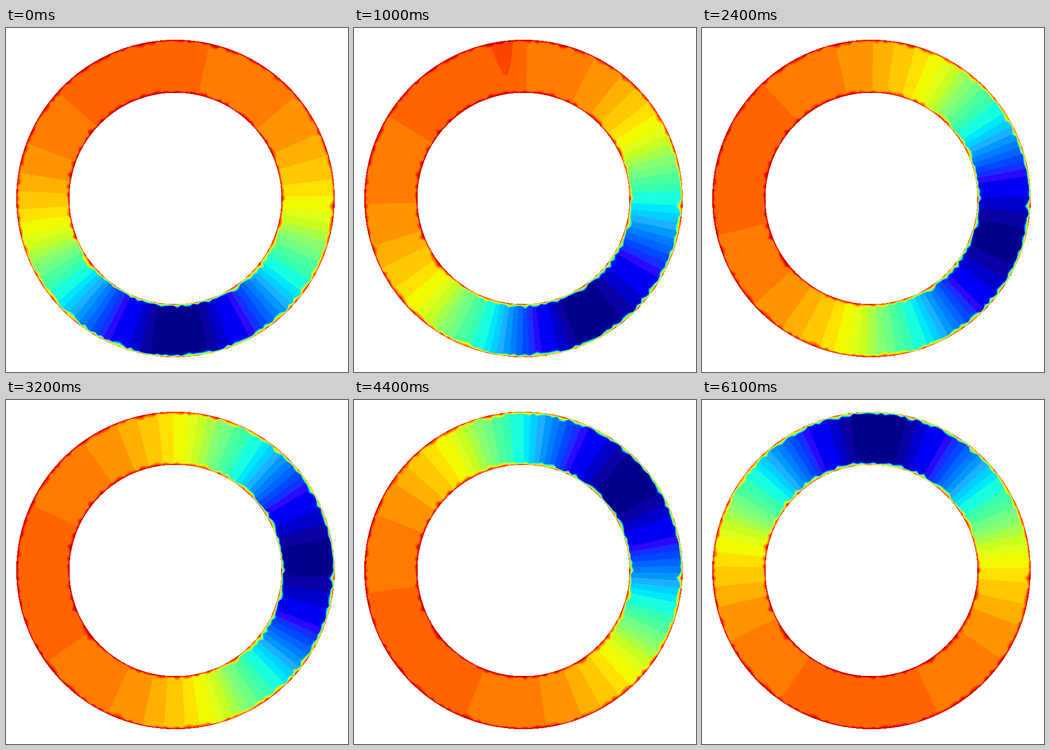
These frames come from a looping animation (666x672 px, 6.2 s). An HTML page with a canvas:

```html
<!DOCTYPE html>
<html lang="en">
<head>
<meta charset="utf-8">
<title>Ring field</title>
<style>
html, body { margin: 0; width: 100%; height: 100%; overflow: hidden; background: #fefffe; }
canvas { display: block; }
</style>
</head>
<body>
<canvas id="stage" width="666" height="672"></canvas>
<script>
const W = 666, H = 672, CX = 330, CY = 333, R_IN = 206.5, R_OUT = 310;
const LOOP = 6200, STEP = 100, BINS = 7200;

const palette = ('00008a 0a00a4 0000cc 0000f5 0000f5 2a08f8 1430ff 0048ff 0064ff 007cff 0098ff ' +
  '1cb0ff 00d0ff 00e8ff 18ffe0 38ffb0 4cff9c 70ff84 88ff70 a8ff48 c8ff20 ' +
  'e0ff18 f2fa00 ffe000 ffc800 ffb000 ff9400 ff7c00 ff6400 ff4400 f42000 e00000 c00000 a00000')
  .split(' ').map(hex => {
    const n = parseInt(hex, 16);
    return (255 << 24 | (n & 255) << 16 | (n & 0xff00) | n >> 16) >>> 0;
  });
const TOP = palette.length - 0.5, HOT = 28;

const mix = (a, b, k) => a + (b - a) * k;
const mod = (a, n) => ((a % n) + n) % n;
const rad = deg => deg * Math.PI / 180;
const bell = (t, at, width) => Math.exp(-(((t - at) / width) ** 2));

let seed = 4711;
function rand() {
  seed = (seed * 16807) % 2147483647;
  return seed / 2147483647;
}

// Fixed ragged rim: depth and strength at nodes around the edge
function makeRim(count, spots) {
  const nodes = Array.from({ length: count }, () => (
    { depth: 3 + 8 * rand() ** 1.5, power: 0.72 + 0.28 * rand() }
  ));
  for (const deg of spots) {
    const i = Math.round(mod(deg, 360) / 360 * count) % count;
    nodes[i] = { depth: 13, power: 1 };
  }
  return (deg, d) => {
    const p = deg / 360 * count, i = Math.floor(p) % count, k = p - Math.floor(p);
    const a = nodes[i], b = nodes[(i + 1) % count];
    return Math.max(0, 1 - d / mix(a.depth, b.depth, k)) * mix(a.power, b.power, k);
  };
}
const outerRim = makeRim(250, [3]);
const innerRim = makeRim(170, [-142, 142, 39, -168, 158]);

const cells = [];
for (let y = 0; y < H; y++) {
  for (let x = 0; x < W; x++) {
    const dx = x + 0.5 - CX, dy = y + 0.5 - CY, r = Math.hypot(dx, dy);
    if (r < R_IN || r > R_OUT) continue;
    const deg = mod(Math.atan2(dy, dx) * 180 / Math.PI, 360);
    const rim = Math.max(outerRim(deg, R_OUT - r), innerRim(deg, r - R_IN));
    cells.push({ at: y * W + x, bin: Math.floor(deg / 360 * BINS) % BINS, deg, r, rim });
  }
}

// Level against distance in degrees from the cold spot
const profile = width => [[0, 0.3], [width, 1], [18.7, 3], [26.3, 5], [51, 14], [56, 15],
  [80.5, 22], [91.5, 24], [107, 26], [120.5, 27], [150, HOT], [180, HOT]];

const field = new Float32Array(BINS);
function fillField(t) {
  // Steady turn with a start-up swing that settles
  const cold = 86.5 - 28.54 * t + 4.5 * bell(t, 0.75, 0.9);
  const width = 8.7 + 1.8 * Math.cos(2 * Math.PI * t / 5.6);
  const lean = 12 * bell(t, 0, 0.6) + 1.2 * (3.8 - t);
  const surge = 9 * bell(t, 1, 0.6);
  const shift = d => lean * (d / 150) ** 3 + surge * Math.sin(rad(1.35 * d));

  const half = profile(width);
  const stops = [
    ...half.map(([d, v]) => [d + shift(d), v]),
    ...half.reverse().map(([d, v]) => [360 - d + shift(d), v])
  ];
  let s = 0;
  for (let n = 0; n < BINS; n++) {
    const d = n * 360 / BINS;
    while (d >= stops[s + 1][0]) s++;
    const [d0, v0] = stops[s], [d1, v1] = stops[s + 1];
    const bin = Math.floor(mod(cold - d, 360) / 360 * BINS + 1e-6) % BINS;
    field[bin] = mix(v0, v1, (d - d0) / (d1 - d0)) + 1e-4;
  }
}

const ctx = document.getElementById('stage').getContext('2d');
const image = ctx.createImageData(W, H);
const pixels = new Uint32Array(image.data.buffer).fill(0xfffefffe);

function draw(t) {
  fillField(t);
  const tip = 242 + Math.abs(t - 1) * 150;
  for (const c of cells) {
    let v = field[c.bin];
    // Brief hot tongue reaching in from the outer edge
    if (c.r > tip && v >= HOT && ((c.deg - 262) / 4.2) ** 2 < (c.r - tip) / 62) v = HOT + 1.1;
    v += (TOP - v) * c.rim;
    pixels[c.at] = palette[Math.floor(v)];
  }
  ctx.putImageData(image, 0, 0);
}

let shown = -1;
function tick() {
  const t = Math.floor((performance.now() % LOOP) / STEP) * STEP;
  if (t !== shown) {
    shown = t;
    draw(t / 1000);
  }
  requestAnimationFrame(tick);
}
tick();
</script>
</body>
</html>
```
